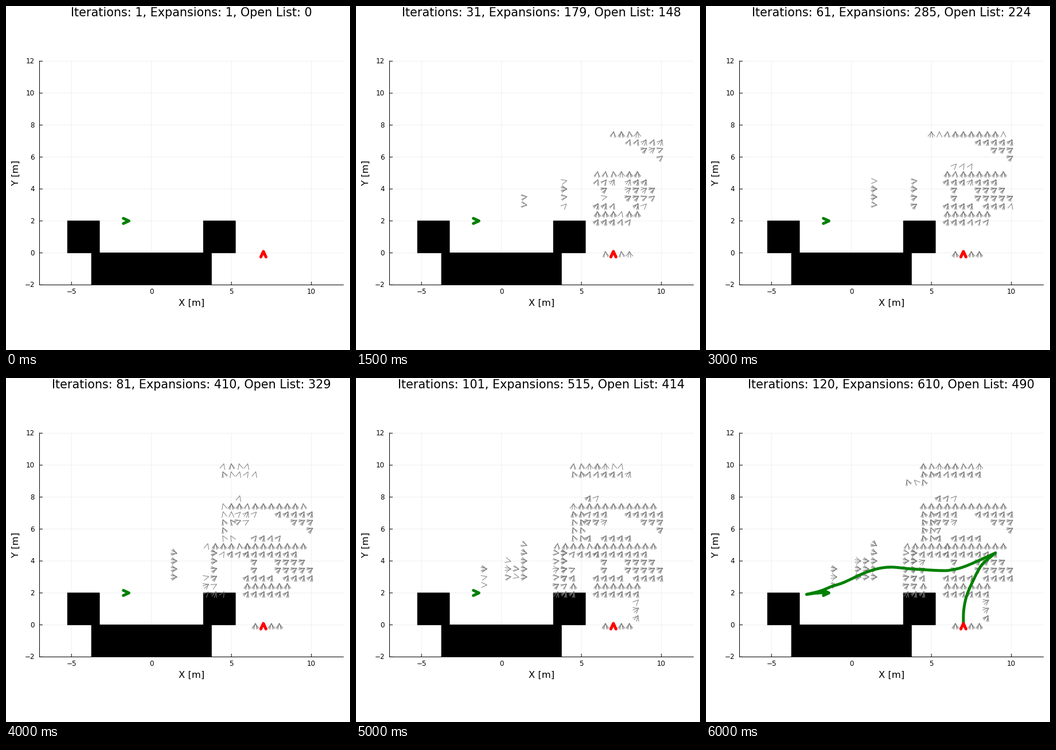
Animation, 600 px wide and 600 px high, one loop 6.5 s. Source, as a matplotlib script:

```python
import math
import random

import numpy as np
import matplotlib.pyplot as plt
from matplotlib.animation import FuncAnimation
from matplotlib.collections import LineCollection
from matplotlib.patches import Rectangle

SIZE, DPI = 600, 100
PT = 72 / DPI  # points per pixel
STEPS, INTERVAL = 13, 500
TURN = math.radians(15)  # heading resolution
TIP, BACK, SIDE = 2.6, 9.8, 4.5  # arrowhead shape in pixels

plt.rcParams["font.family"] = "DejaVu Sans"
rng = random.Random(4)


def px(x):
    return 253.7 + 27.89 * x


def py(y):
    return 430.6 - 27.86 * y


def chevron(x, y, heading):
    """Arrowhead polyline in pixels for a pose in metres."""
    c, s = math.cos(heading), math.sin(heading)
    cx, cy = px(x), py(y)

    def place(along, across):
        return cx + along * c - across * s, cy - along * s - across * c

    return [place(TIP - BACK, SIDE), place(TIP, 0), place(TIP - BACK, -SIDE)]


def smooth(points, n=12):
    """Catmull-Rom curve through the points, in pixels."""
    p = np.array([(px(x), py(y)) for x, y in points])
    p = np.vstack([2 * p[0] - p[1], p, 2 * p[-1] - p[-2]])
    t = np.linspace(0, 1, n)[:, None]
    parts = []
    for a, b, c, d in zip(p, p[1:], p[2:], p[3:]):
        parts.append(0.5 * (2 * b + (c - a) * t
                            + (2 * a - 5 * b + 4 * c - d) * t ** 2
                            + (3 * b - a - 3 * c + d) * t ** 3))
    return np.vstack(parts)


def main_heading(x, y):
    """Heading index: upright every 2.5 m, leaning sideways in between."""
    if x < 4.2 and 2.5 <= y <= 4.5 or x < 2.5:
        return round(3.5 - y + max(0, x - 2) / 2)
    lean = abs(math.sin(math.pi * y / 2.5))
    if y > 4.5 and x < 5.5:
        return round(6 + 2.5 * lean)
    return round(6 - 4 * lean)


poses = []  # (step of appearance, arrowhead)


def grow(start, end, first, last, keep=lambda x, y: True):
    """Open lattice cells from one corner of a box towards the other."""
    (x0, y0), (x1, y1) = start, end
    span = abs(x1 - x0) + abs(y1 - y0)
    for y in np.arange(min(y0, y1), max(y0, y1) + 0.1, 0.5):
        for x in np.arange(min(x0, x1), max(x0, x1) + 0.1, 0.5):
            if not keep(x, y):
                continue
            way = (abs(x - x0) + abs(y - y0)) / span
            born = int(first + (last - first) * way ** 2)
            offsets = [-1, 0, 1]
            rng.shuffle(offsets)
            for offset, wait in zip(offsets, (0, rng.randint(0, 2),
                                              rng.randint(0, 5))):
                heading = main_heading(x, y) + offset
                poses.append((born + wait, chevron(x, y, heading * TURN)))


# Around the start
grow((6.5, 0), (8, 0), 1, 2)
grow((6, 2.5), (8.5, 2), 1, 5)
grow((6, 3), (7.5, 3), 1, 4)
grow((6.5, 3.5), (6.5, 4), 2, 2)
grow((6, 4.5), (7.5, 4.5), 2, 6)
grow((8.5, 0.5), (8.5, 1.5), 10, 10)
# Right turns
grow((8, 4.5), (10, 3), 1, 6, lambda x, y: 11.5 <= x + y <= 13.5)
grow((8, 7), (10, 6), 1, 3, lambda x, y: x + 2 * y >= 22)
# Upper rows
grow((8.5, 5), (6, 5), 1, 3)
grow((9, 5), (9.5, 5), 4, 5)
grow((7, 7.5), (9.5, 7.5), 1, 6)
grow((6.5, 7.5), (4.5, 7.5), 4, 8)
grow((6.5, 5.5), (8, 5.5), 6, 8)
grow((4.5, 7), (6.5, 6.5), 7, 9)
grow((4.5, 9.5), (8, 10), 8, 11)
grow((5.5, 8), (6.5, 8), 8, 12)
grow((3.5, 9), (4.5, 9), 12, 12)
# Towards the goal
grow((4, 3), (4, 4.5), 3, 3)
grow((1.5, 3), (1.5, 5), 3, 9)
grow((6, 5), (3.5, 4.5), 7, 9)
grow((4.5, 5.5), (5.5, 6), 8, 11)
grow((3.5, 2), (4.5, 4), 8, 12)
grow((-1, 2.5), (-1, 3.5), 9, 9)
grow((0.5, 3), (1, 4), 9, 11)

# Forward, reverse and final forward parts of the solution
LEGS = [
    [(7, 0), (7.02, 0.9), (7.2, 1.8), (7.6, 2.75), (8.15, 3.75), (9, 4.5)],
    [(9, 4.5), (7.2, 3.7), (6.3, 3.45), (5.6, 3.4), (3.8, 3.5), (2.3, 3.61),
     (1.05, 3.34), (-0.5, 2.65), (-1.2, 2.42), (-1.95, 2.12), (-2.8, 1.91)],
    [(-2.8, 1.91), (-2.1, 2), (-1.5, 2)],
]

fig = plt.figure(figsize=(SIZE / DPI, SIZE / DPI), dpi=DPI, facecolor="white")
ax = fig.add_axes([0, 0, 1, 1])
ax.set_xlim(0, SIZE)
ax.set_ylim(SIZE, 0)
ax.axis("off")


def line(xs, ys, width, color, z, **style):
    return ax.plot(xs, ys, lw=width * PT, color=color, zorder=z, snap=False,
                   **style)[0]


def label(x, y, text, size, ha="center", **style):
    return ax.text(x, y, text, fontsize=size * PT, ha=ha, va="baseline",
                   zorder=9, **style)


LEFT, RIGHT, TOP, BOTTOM = 58.5, 588.5, 96, 486.5
for v in range(-5, 11, 5):
    line([px(v)] * 2, [TOP, BOTTOM], 1, "#f0f0f0", 1)
    line([px(v)] * 2, [BOTTOM, BOTTOM - 5], 1, "black", 3)
    label(px(v), 502, str(v).replace("-", "\u2212"), 11.9)
for v in range(-2, 13, 2):
    line([LEFT, RIGHT], [py(v)] * 2, 1, "#f0f0f0", 1)
    line([LEFT, LEFT + 5], [py(v)] * 2, 1, "black", 3)
    label(50, py(v) + 4.1, str(v).replace("-", "\u2212"), 11.9, ha="right")
line([LEFT, LEFT, RIGHT], [TOP, BOTTOM, BOTTOM], 1, "black", 3)
label(323.5, 522.5, "X [m]", 16.4)
label(22, 290.5, "Y [m]", 16.4, rotation=90, rotation_mode="anchor")

for x, y, w in [(-5.25, 0, 2), (3.25, 0, 2), (-3.75, -2, 7.5)]:
    ax.add_patch(Rectangle((px(x), py(y + 2)), px(w) - px(0), py(0) - py(2),
                           facecolor="black", edgecolor="black",
                           lw=PT, zorder=2, snap=False))

heads = LineCollection([], colors="gray", linewidths=PT, zorder=4)
ax.add_collection(heads)

thick = dict(solid_capstyle="round", solid_joinstyle="round")
path = [line(*smooth(leg).T, 5, "green", 5, **thick) for leg in LEGS]
line(*zip(*chevron(-1.5, 2, 0)), 5, "green", 6, **thick)
line(*zip(*chevron(7, 0, math.pi / 2)), 5, "red", 6, **thick)
title = label(323.3, 18, "", 20.72)


def draw(step):
    rounds = min(1 + 10 * step, 120)
    total = int(np.interp(step, [0, 1, 3, 6, 9, 11, 12],
                          [1, 80, 179, 285, 473, 558, 610]))
    title.set_text(f"Iterations: {rounds}, Expansions: {total}, "
                   f"Open List: {total - rounds}")
    heads.set_segments([head for born, head in poses if born <= step])
    for leg in path:
        leg.set_visible(step == STEPS - 1)
    return [title, heads, *path]


anim = FuncAnimation(fig, draw, frames=STEPS, init_func=lambda: draw(0),
                     interval=INTERVAL, repeat=True, repeat_delay=0)
plt.show()
```
